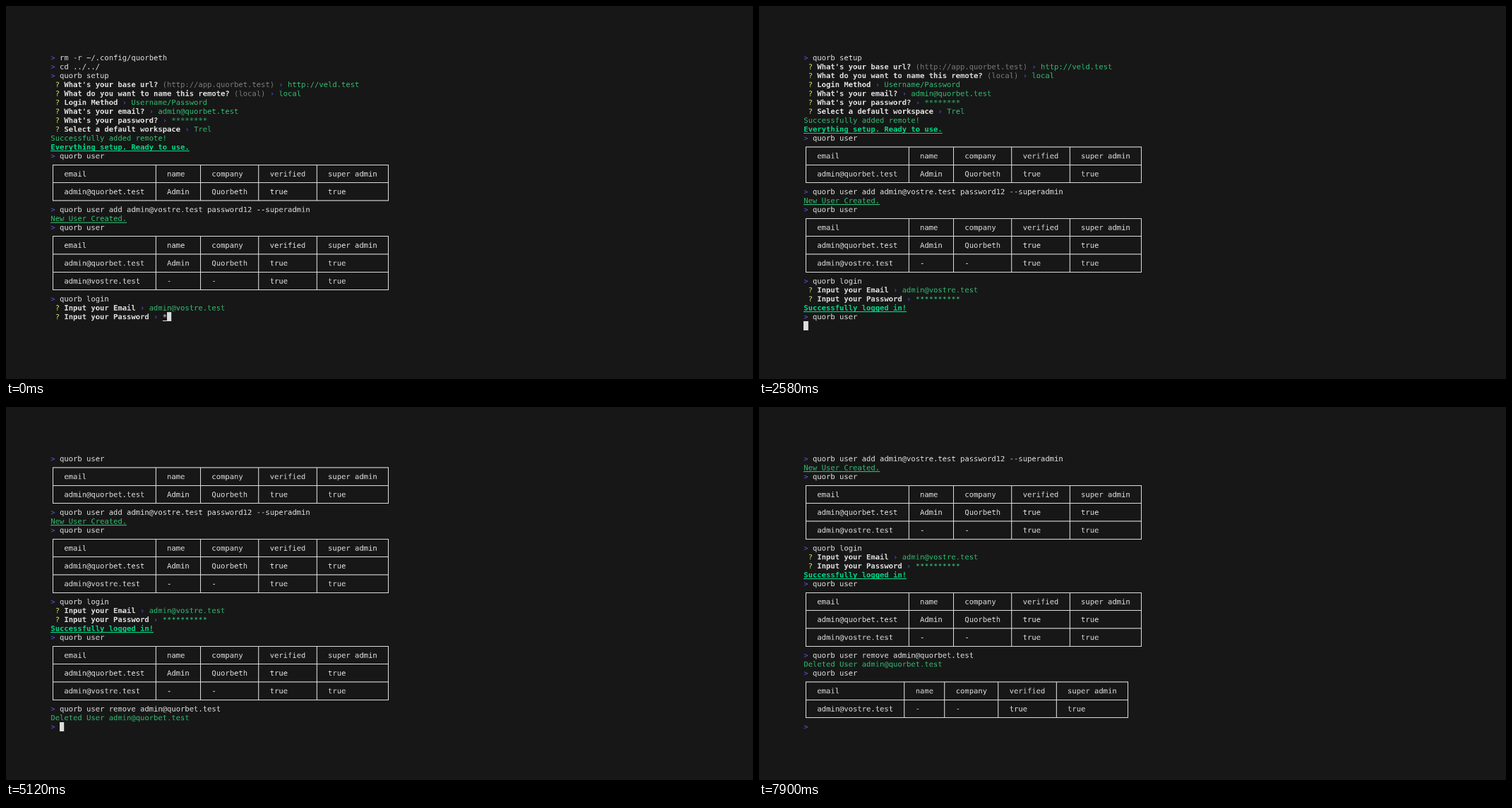
An HTML page with a canvas that plays this animation: 1058 px wide and 529 px high, repeating every 8 s.

```html
<!DOCTYPE html>
<html lang="en">
<head>
<meta charset="utf-8">
<title>Terminal session</title>
<style>
  html, body { margin: 0; width: 100%; height: 100%; overflow: hidden; background: #171717; }
  canvas { display: block; width: 1058px; height: 529px; }
</style>
</head>
<body>
<canvas id="screen" width="1058" height="529"></canvas>
<script>
// Text is set on a whole-pixel cell grid, which is then scaled onto the stage
const LOOP = 8000, ROWS = 31, COLS = 100;
const CELL_W = 12, CELL_H = 24, BASELINE = 19, STROKE = 2;
const SCALE = 19 / 36, LEFT = 190 / 3, TOP = 66.95;
const KEY_MS = 53;
const BACK = '#171717';
const FONT = '20px "DejaVu Sans Mono", monospace';

const stage = document.getElementById('screen').getContext('2d');
const grid = document.createElement('canvas');
grid.width = COLS * CELL_W;
grid.height = ROWS * CELL_H;
const ctx = grid.getContext('2d');

const STYLES = {
  text: { color: '#dddddd' },
  bold: { color: '#dddddd', bold: true },
  input: { color: '#dddddd', line: true },
  prompt: { color: '#5a56e0' },
  mark: { color: '#d3e561' },
  dim: { color: '#7a7a7a' },
  green: { color: '#31bb71' },
  link: { color: '#31bb71', line: true },
  done: { color: '#00d787', bold: true, line: true }
};

// Directions in which each box character reaches from its centre
const ARMS = {
  '─': 'lr', '│': 'ud', '┌': 'rd', '┐': 'ld', '└': 'ru', '┘': 'lu',
  '┬': 'lrd', '┴': 'lru', '├': 'rud', '┤': 'lud', '┼': 'lrud'
};

// A line is a list of [style, text] parts
const command = text => [['prompt', '> '], ['text', text]];
const ask = (question, answer, hint = '', style = 'green') => [
  ['mark', ' ? '], ['bold', question], ['dim', hint && ` (${hint})`],
  ['prompt', ' › '], [style, answer]
];

function table(...body) {
  const rows = [['email', 'name', 'company', 'verified', 'super admin'], ...body];
  const widths = rows[0].map((_, i) => Math.max(...rows.map(r => r[i].length)));
  const rule = (a, b, c) => [['text', a + widths.map(w => '─'.repeat(w + 4)).join(b) + c]];
  const lines = [rule('┌', '┬', '┐')];
  rows.forEach((row, n) => {
    if (n) lines.push(rule('├', '┼', '┤'));
    const cells = row.map((cell, i) => `  ${cell.padEnd(widths[i])}  `);
    lines.push([['text', '│' + cells.join('│') + '│']]);
  });
  lines.push(rule('└', '┴', '┘'));
  return lines;
}

const OWNER = 'admin@quorbet.test', GUEST = 'admin@vostre.test';
const ownerRow = [OWNER, 'Admin', 'Quorbeth', 'true', 'true'];
const guestRow = [GUEST, '-', '-', 'true', 'true'];

const HISTORY = [
  command('rm -r ~/.config/quorbeth'),
  command('cd ../../'),
  command('quorb setup'),
  ask("What's your base url?", 'http://veld.test', 'http://app.quorbet.test'),
  ask('What do you want to name this remote?', 'local', 'local'),
  ask('Login Method', 'Username/Password'),
  ask("What's your email?", OWNER),
  ask("What's your password?", '********'),
  ask('Select a default workspace', 'Trel'),
  [['green', 'Successfully added remote!']],
  [['done', 'Everything setup. Ready to use.']],
  command('quorb user'),
  ...table(ownerRow),
  command(`quorb user add ${GUEST} password12 --superadmin`),
  [['link', 'New User Created.']],
  command('quorb user'),
  ...table(ownerRow, guestRow),
  command('quorb login'),
  ask('Input your Email', GUEST)
];

// Times: prompt shown, first key, enter, output printed
const COMMANDS = [
  { shown: 880, keys: 2040, enter: 2580, print: 2680, text: 'quorb user',
    output: table(ownerRow, guestRow) },
  { shown: 2700, keys: 3080, enter: 4980, print: 5100, text: `quorb user remove ${OWNER}`,
    output: [[['green', `Deleted User ${OWNER}`]]] },
  { shown: 5120, keys: 5500, enter: 6040, print: 6120, text: 'quorb user',
    output: table(guestRow) },
  { shown: 6120, keys: Infinity, enter: Infinity, print: Infinity, text: '', output: [] }
];

const typed = (text, start, t) =>
  text.slice(0, t < start ? 0 : Math.floor((t - start) / KEY_MS) + 1);

const blinkedOff = (cmd, t) =>
  t < cmd.keys && Math.floor((t - cmd.shown - 20) / 580) % 2 === 1;

// Everything printed by time t; the cursor sits at the end of the last line
function session(t) {
  const lines = [...HISTORY];
  let cursor = true;
  if (t < 540) {
    const stars = '*' + typed('*********', 60, t);
    lines.push(ask('Input your Password', stars, '', 'input'));
    return { lines, cursor };
  }
  lines.push(ask('Input your Password', '**********'));
  if (t >= 860) lines.push([['done', 'Successfully logged in!']]);
  for (const cmd of COMMANDS) {
    if (t < cmd.shown) break;
    lines.push(command(typed(cmd.text, cmd.keys, t)));
    if (t < cmd.enter) {
      cursor = !blinkedOff(cmd, t);
      return { lines, cursor };
    }
    if (t >= cmd.print) lines.push(...cmd.output);
  }
  lines.push([]);
  return { lines, cursor };
}

function drawBox(arms, x, y) {
  const w = CELL_W / 2, h = CELL_H / 2, edge = STROKE / 2;
  if (arms.includes('l')) ctx.fillRect(x, y + h - edge, w + edge, STROKE);
  if (arms.includes('r')) ctx.fillRect(x + w - edge, y + h - edge, w + edge, STROKE);
  if (arms.includes('u')) ctx.fillRect(x + w - edge, y, STROKE, h + edge);
  if (arms.includes('d')) ctx.fillRect(x + w - edge, y + h - edge, STROKE, h + edge);
}

// Draws one line and returns the x where it ends
function drawLine(parts, y) {
  let x = 0;
  for (const [name, text] of parts) {
    const style = STYLES[name];
    ctx.fillStyle = style.color;
    ctx.font = (style.bold ? 'bold ' : '') + FONT;
    if (style.line) ctx.fillRect(x, y + CELL_H - STROKE, text.length * CELL_W, STROKE);
    for (const ch of text) {
      if (ARMS[ch]) drawBox(ARMS[ch], x, y);
      else if (ch !== ' ') ctx.fillText(ch, x, y + BASELINE);
      x += CELL_W;
    }
  }
  return x;
}

function draw(t) {
  ctx.fillStyle = stage.fillStyle = BACK;
  ctx.fillRect(0, 0, grid.width, grid.height);
  stage.fillRect(0, 0, 1058, 529);
  const { lines, cursor } = session(t);
  let x = 0, y = 0;
  lines.slice(-ROWS).forEach((line, row) => {
    y = row * CELL_H;
    x = drawLine(line, y);
  });
  if (cursor) {
    ctx.fillStyle = '#dddddd';
    ctx.fillRect(x, y, CELL_W, CELL_H);
  }
  stage.drawImage(grid, LEFT, TOP, grid.width * SCALE, grid.height * SCALE);
}

const start = performance.now();
function tick() {
  draw((performance.now() - start) % LOOP);
  requestAnimationFrame(tick);
}
tick();
</script>
</body>
</html>
```
